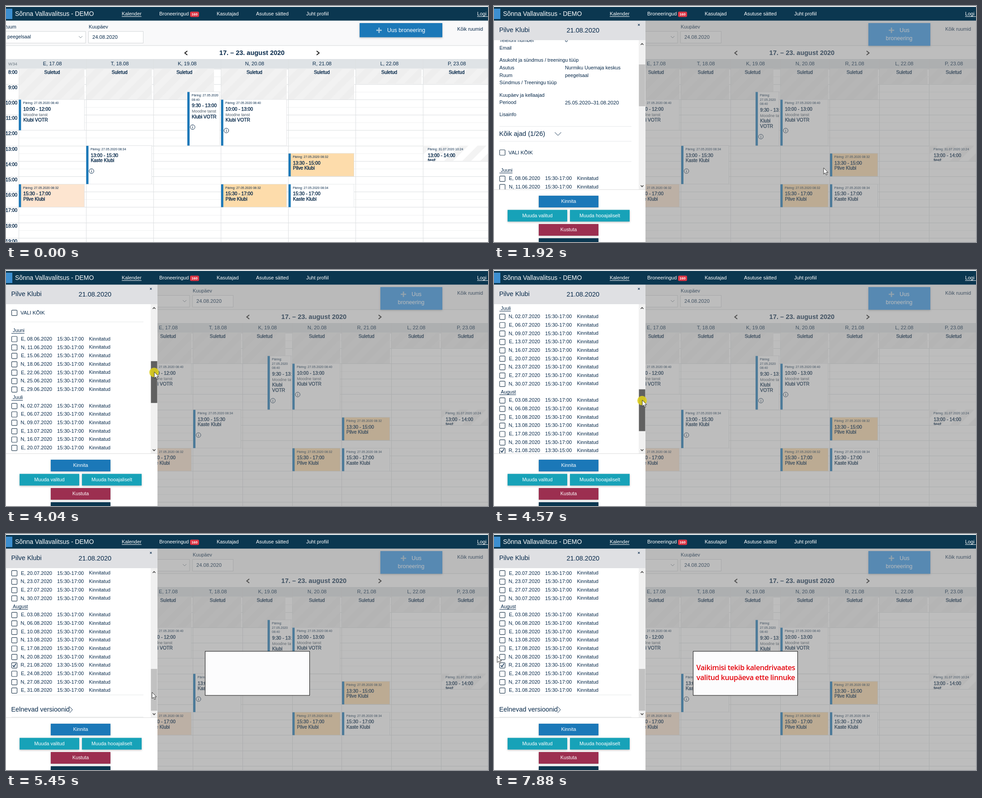
Recreate the animation shown at these times as an HTML page with a canvas. Size 1066 by 525 pixels, loop 8000 ms.

```html
<!DOCTYPE html>
<html lang="et">
<head>
<meta charset="utf-8">
<title>Broneeringute kalender</title>
<style>
html, body { margin: 0; width: 100%; height: 100%; overflow: hidden; background: #fff; }
canvas { display: block; }
</style>
</head>
<body>
<canvas id="stage" width="1066" height="525"></canvas>
<script>
const g = document.getElementById('stage').getContext('2d');
const LOOP = 8000, OPEN = 1920, GRAB = 3490, RELEASE = 5130, RATIO = 3.168;
const NAVY = '#0b3750', INK = '#07294a', BLUE = '#1b78b8', LINE = '#dcdfe1';
const SANS = '"Liberation Sans", Arial, sans-serif';
const HOUR = 34.22, TOP = 139.5;
const DAYS = ['E, 17.08', 'T, 18.08', 'K, 19.08', 'N, 20.08', 'R, 21.08', 'L, 22.08', 'P, 23.08'];

// Calendar layout with the side panel closed and open
const WIDE = { x: 28, step: 149.1, short: 133.5, title: 544, date: 182, button: 782 };
const NARROW = { x: 304, step: 109.7, short: 94, title: 681, date: 412, button: 828 };

// Pointer moves: start, end, steps, control point, end point
const MOVES = [
  [410, 510, 2, [892, 455], [793, 366]],
  [840, 1490, 7, [755, 338], [729, 360]],
  [2270, 2490, 3, [590, 250], [444, 147]],
  [2710, 3490, 8, [385, 142], [328, 154]],
  [RELEASE, RELEASE, 1, [328, 324], [328, 324]],
  [RELEASE, 5450, 4, [328, 340], [323, 352]],
  [5550, 5770, 3, [200, 330], [112, 307]],
  [6000, 6760, 8, [40, 285], [8, 276]],
  [6880, 7660, 8, [75, 326], [7, 272]]
];

function step(t, a, b, n) {
  if (t < a) return 0;
  if (t >= b) return 1;
  return (Math.floor((t - a) / (b - a) * (n - 1) + .02) + 1) / n;
}

function pointer(t) {
  let p = [991, 544];
  for (const [a, b, n, c, e] of MOVES) {
    const u = step(t, a, b, n);
    p = p.map((v, i) => (1 - u) ** 2 * v + 2 * u * (1 - u) * c[i] + u * u * e[i]);
  }
  return p;
}

const scrollAt = t =>
  429 * (1 - (1 - step(t, 3810, 4570, 8)) ** 1.64) + 110 * step(t, 4690, 5020, 4);

function rect(x, y, w, h, fill, stroke) {
  if (fill) { g.fillStyle = fill; g.fillRect(x, y, w, h); }
  if (stroke) { g.strokeStyle = stroke; g.lineWidth = 1; g.strokeRect(x, y, w, h); }
}

function text(s, x, y, size = 10.8, color = INK, weight = 400, align = 'left') {
  g.font = `${weight} ${size}px ${SANS}`;
  g.textAlign = align;
  g.fillStyle = color;
  g.fillText(s, x, y);
}

// Regular letters, slightly thickened
function strong(s, x, y, align) {
  text(s, x, y, 10.3, INK, 400, align);
  g.strokeStyle = INK;
  g.lineWidth = .4;
  g.strokeText(s, x, y);
}

function poly(points, color, width = 1) {
  g.beginPath();
  points.forEach(p => g.lineTo(...p));
  g.strokeStyle = color;
  g.lineWidth = width;
  g.stroke();
}

function clipped(x, y, w, h, draw) {
  g.save();
  g.beginPath();
  g.rect(x, y, w, h);
  g.clip();
  draw();
  g.restore();
}

function shadowed(draw) {
  g.save();
  g.shadowColor = 'rgba(0,0,0,.25)';
  g.shadowBlur = 4;
  g.shadowOffsetY = 1;
  draw();
  g.restore();
}

function underlined(s, x, y, size, color) {
  text(s, x, y, size, color);
  rect(x, Math.round(y + 5), g.measureText(s).width, 1, color);
}

function stripes(x, y, w, h, base, band) {
  clipped(x, y, w, h, () => {
    rect(x, y, w, h, base);
    for (let i = x - h; i < x + w + h; i += 40)
      poly([[i, y + h + 10], [i + h + 20, y - 10]], band, 14);
  });
}

function info(x, y) {
  g.beginPath();
  g.arc(x, y, 5.2, 0, 7);
  g.strokeStyle = INK;
  g.lineWidth = 1;
  g.stroke();
  rect(x - .5, y - 1, 1, 4, INK);
  rect(x - .5, y - 3, 1, 1, INK);
}

function topBar() {
  rect(0, 0, 1066, 2, '#fdfdfd');
  rect(0, 2, 1066, 30.5, NAVY);
  rect(-9, 6, 23, 23, '#3d8fd0');
  text('Sõnna Vallavalitsus - DEMO', 20, 18.5, 13.9, '#fff');
  underlined('Kalender', 256, 18, 10.9, '#fff');
  text('Broneeringud', 339, 18, 10.9, '#fff');
  g.beginPath();
  g.roundRect(407, 12.5, 20, 12, 3);
  g.fillStyle = '#dc3545';
  g.fill();
  text('160', 417, 19, 8, '#fff', 700, 'center');
  text('Kasutajad', 466, 18, 10.9, '#fff');
  text('Asutuse sätted', 553, 18, 10.9, '#fff');
  text('Juht profiil', 664, 18, 10.9, '#fff');
  underlined('Logi ', 1042, 18, 10.9, '#fff');
}

function toolBar(v, open) {
  rect(0, 32, 1066, 56, '#f9f9fa');
  rect(0, 87.5, 1066, 1, '#d5d9dc');
  text('Ruum', -6, 47.5);
  rect(-5.5, 56.5, v.date - .5, 26, '#fff', '#d3d6d8');
  text('peegelsaal', 3, 69.5);
  const c = v.date - 17;
  poly([[c - 4, 67], [c, 71], [c + 4, 67]], '#7c8790');
  text('Kuupäev', v.date + 1, 47.5);
  rect(v.date + .5, 56.5, open ? 90 : 121, 26, '#fff', '#d3d6d8');
  text('24.08.2020', v.date + 9, 69.5, 11.2);
  shadowed(() => rect(v.button, 38, 965 - v.button, open ? 50.5 : 31.5, open ? '#3398ea' : BLUE));
  const px = open ? 879 : 825;
  rect(px - 6, 52.7, 12, 2.6, '#a9c9df');
  rect(px - 1.3, 48, 2.6, 12, '#a9c9df');
  if (open) {
    text('Uus', 897, 54.5, 12.3, '#fff');
    text('broneering', 896, 73, 12.3, '#fff', 400, 'center');
  } else text('Uus broneering', 843, 54.5, 12.3, '#fff');
  text('Kõik ruumid', 998, 52.5);
}

function calendar(v) {
  const dayX = d => v.x + d * v.step;
  const hourY = h => TOP + (h - 8) * HOUR;

  text('17. – 23. august 2020', v.title, 105, 14.5, INK, 700, 'center');
  for (const s of [-1, 1]) {
    const x = v.title + s * 146;
    poly([[x - s * 3, 100], [x + s * 2.5, 104.5], [x - s * 3, 109]], '#222', 2);
  }
  rect(0, 118, 1066, 21.5, '#dfe3e6');
  text('W34', 25, 129, 9.7, '#6a7680', 400, 'right');

  for (let h = 8; h < 20; h++) {
    const y = Math.round(hourY(h));
    rect(0, y, 1066, 1, LINE);
    rect(v.x, Math.round(hourY(h + .5)), 1066, 1, '#f0f1f2');
    strong(h + ':00', 25, y + 8.5, 'right');
  }
  DAYS.forEach((name, d) => {
    const x = dayX(d), w = d == 2 ? v.short : v.step - 4;
    rect(Math.round(x - .5), 118, 1, 407, '#dde0e2');
    text(name, x + v.step / 2, 129, 11.2, INK, 400, 'center');
    stripes(x + .5, TOP, w, HOUR * (d > 4 ? 1 : 2), '#eeeeee', '#f2f2f2');
    rect(x, Math.round(hourY(d > 4 ? 9 : 10)), w, 1, LINE);
    strong('Suletud', x + w / 2 + 1.5, 148, 'center');
  });

  function event(d, from, to, head, time, what, name, o = {}) {
    const x = dayX(d) + (o.half ? v.step / 2 : 0) + .3;
    const w = o.half ? v.step / 2 - 3 : v.step - 4;
    const y = hourY(from), h = (to - from) * HOUR;
    clipped(x - .5, y - .5, w + 1, h + .5, () => {
      if (o.plain) stripes(x, y, w, h, '#fff', '#f3f3f3');
      else {
        rect(x, y, w, h, o.bg || '#fff', '#dfe2e4');
        rect(x, y + .5, 5, h, BLUE);
      }
      let at = y - 1;
      for (const s of head.split('|')) text(s, x + 9.5, at += 9.5, 7);
      strong(time, x + 10, at += 13.7);
      if (what) text(what, x + 10, at += 12.5, 8.9, '#4b5a68');
      for (const s of name.split('|')) strong(s, x + 10, at += 11.7);
      if (o.info) info(x + 11.7, at + 22.7);
    });
  }
  const at = m => 'Päring: 27.05.2020 08:' + m;
  const narrow = v == NARROW;
  event(0, 10, 12, at(40), '10:00 - 12:00', 'Moodne tanst', 'Klubi VOTR');
  event(2, 9.5, 13, narrow ? 'Päring:|27.05.2020|08:40' : 'Päring: 27.05.2020|08:40',
    '9:30 - 13:00', 'Moodne tanst', narrow ? 'Klubi|VOTR' : 'Klubi VOTR', { half: true, info: true });
  event(3, 10, 13, at(40), '10:00 - 13:00', 'Moodne tanst', 'Klubi VOTR', { info: true });
  event(1, 13, 15.5, at(34), '13:00 - 15:30', '', 'Kaste Klubi', { info: true });
  event(4, 13.5, 15, at(32), '13:30 - 15:00', '', 'Pilve Klubi', { bg: '#fddcab' });
  event(0, 15.5, 17, at(32), '15:30 - 17:00', '', 'Pilve Klubi', { bg: '#fde5d0' });
  event(3, 15.5, 17, at(32), '15:30 - 17:00', '', 'Pilve Klubi', { bg: '#fddcab' });
  event(4, 15.5, 17, at(34), '15:30 - 17:00', '', 'Kaste Klubi');
  event(6, 13, 14, 'Päring: 31.07.2020 10:24', '13:00 - 14:00', '', 'test', { plain: true });
}

function checkBox(y, on) {
  g.beginPath();
  g.roundRect(12.5, y - 6, 12, 12, 1.5);
  g.strokeStyle = '#2b4256';
  g.lineWidth = 1.2;
  g.stroke();
  if (on) poly([[15, y], [17.5, y + 3], [22, y - 4]], INK, 1.6);
}

function month(name, num, y, first, gap, last) {
  underlined(' ' + name, 12, y, 10.8, INK);
  y += 18.3;
  const row = (letter, d, hours) => {
    checkBox(y, letter == 'R');
    text(`${letter}, ${String(d).padStart(2, 0)}.0${num}.2020`, 102, y, 11.1, INK, 400, 'right');
    text(hours, 113, y, 11.1);
    text('Kinnitatud', 183.5, y, 10.7);
    y += 18.67;
  };
  for (let d = first; d <= last; d += gap, gap = 7 - gap) {
    row(gap == 3 ? 'E' : 'N', d, '15:30-17:00');
    if (num == 8 && d == 20) row('R', 21, '13:30-15:00');
  }
}

function details() {
  const rows = [
    [77.5, 'Telefoni number', '0'], [94.5, 'Email'],
    [121.5, 'Asukoht ja sündmus / treeningu tüüp'],
    [138.5, 'Asutus', 'Nurmiku Uuemaja keskus'], [155, 'Ruum', 'peegelsaal'],
    [171.5, 'Sündmus / Treeningu tüüp'], [199, 'Kuupäev ja kellaajad'],
    [215.5, 'Periood', '25.05.2020–31.08.2020'], [242.5, 'Lisainfo']
  ];
  for (const [y, label, value = ''] of rows) {
    text(label, 12, y);
    text(value, 157, y, value.startsWith('25') ? 11.3 : 10.8);
  }
  for (const y of [268, 301, 346, 897, 946]) rect(12, y - .5, 292, 1, '#e6e8e9');
  text('Kõik ajad (1/26)', 11.5, 284.5, 14.5);
  poly([[134.5, 281], [141.5, 288], [148.5, 281]], INK);
  checkBox(326);
  text('VALI KÕIK', 32, 326.5, 11.3);
  month('Juuni', 6, 366, 8, 3, 29);
  month('Juuli', 7, 514.8, 2, 4, 30);
  month('August', 8, 701, 3, 3, 31);
  text('Eelnevad versioonid', 11.5, 930.5, 14.4);
  poly([[140.5, 923], [147, 930], [140.5, 937]], INK);
}

function button(label, x, y, color) {
  shadowed(() => rect(x, y, 132, 26, color));
  text(label, x + 66, y + 13.5, 10.8, '#fff', 400, 'center');
}

function panel(scroll, held) {
  rect(0, 32.5, 335, 493, '#fff');
  rect(0, 32.5, 335, 43.5, '#dfe0e3');
  text('Pilve Klubi', 11.5, 54.5, 14.4);
  text('21.08.2020', 160.5, 54.5, 14.5);
  text('×', 320.5, 42.5, 9, INK, 700, 'center');

  clipped(0, 76, 320, 332, () => {
    g.translate(0, -scroll);
    details();
  });
  rect(320, 76, 15, 332, '#f1f1f1');
  rect(320.5, 130 + scroll / RATIO, 14, 93, held ? '#606060' : '#c1c1c1');
  poly([[324.5, 86.5], [327.5, 83.5], [330.5, 86.5]], '#444', 1.6);
  poly([[324.5, 399], [327.5, 402], [330.5, 399]], '#444', 1.6);

  rect(0, 408, 335, 1, '#dcdcdc');
  button('Kinnita', 99, 422, BLUE);
  button('Muuda valitud', 30, 453.5, '#17a2b8');
  button('Muuda hooajaliselt', 168, 453.5, '#17a2b8');
  button('Kustuta', 99, 485, '#9c2f50');
  button('', 99, 516.5, NAVY);
}

function hint(boxAlpha, textAlpha) {
  g.globalAlpha = boxAlpha;
  rect(440.5, 261, 231, 98, '#fcfcfd', '#111');
  g.globalAlpha = textAlpha;
  g.font = '600 16px "Open Sans", "Noto Sans", sans-serif';
  g.letterSpacing = '-0.4px';
  g.textAlign = 'center';
  g.fillStyle = '#e5060f';
  g.fillText('Vaikimisi tekib kalendrivaates', 556.7, 298.5);
  g.fillText('valitud kuupäeva ette linnuke', 556.7, 320.5);
  g.letterSpacing = '0px';
  g.globalAlpha = 1;
}

function arrow(x, y) {
  g.beginPath();
  for (const [dx, dy] of [[0, 0], [0, 14], [3.2, 11], [5.5, 16], [7.8, 15], [5.6, 10.3], [9.8, 10.3]])
    g.lineTo(x + dx, y + dy);
  g.closePath();
  g.fillStyle = '#fff';
  g.fill();
  g.strokeStyle = '#222';
  g.lineWidth = .9;
  g.stroke();
}

function draw(t) {
  const open = t >= OPEN, view = open ? NARROW : WIDE;
  const scroll = scrollAt(t), held = t >= GRAB && t < RELEASE;
  let [x, y] = pointer(t);
  if (t < RELEASE) y += scroll / RATIO;

  g.textBaseline = 'middle';
  rect(0, 0, 1066, 525, '#fff');
  toolBar(view, open);
  calendar(view);
  if (open) {
    rect(0, 32, 1066, 493, 'rgba(125,125,125,.5)');
    panel(scroll, held);
    hint(step(t, 5230, 5450, 3), step(t, 5550, 5770, 3));
  } else if (x < 770) text('=', 699, 374.5, 9, INK, 400, 'center');
  topBar();

  if (held && t >= 3810) {
    g.beginPath();
    g.arc(x - .5, y + 1, 10.5, 0, 7);
    g.fillStyle = 'rgba(220,205,30,.9)';
    g.fill();
  }
  if (t >= 410) arrow(x, y);
}

(function frame() {
  draw(performance.now() % LOOP);
  requestAnimationFrame(frame);
})();
</script>
</body>
</html>
```
